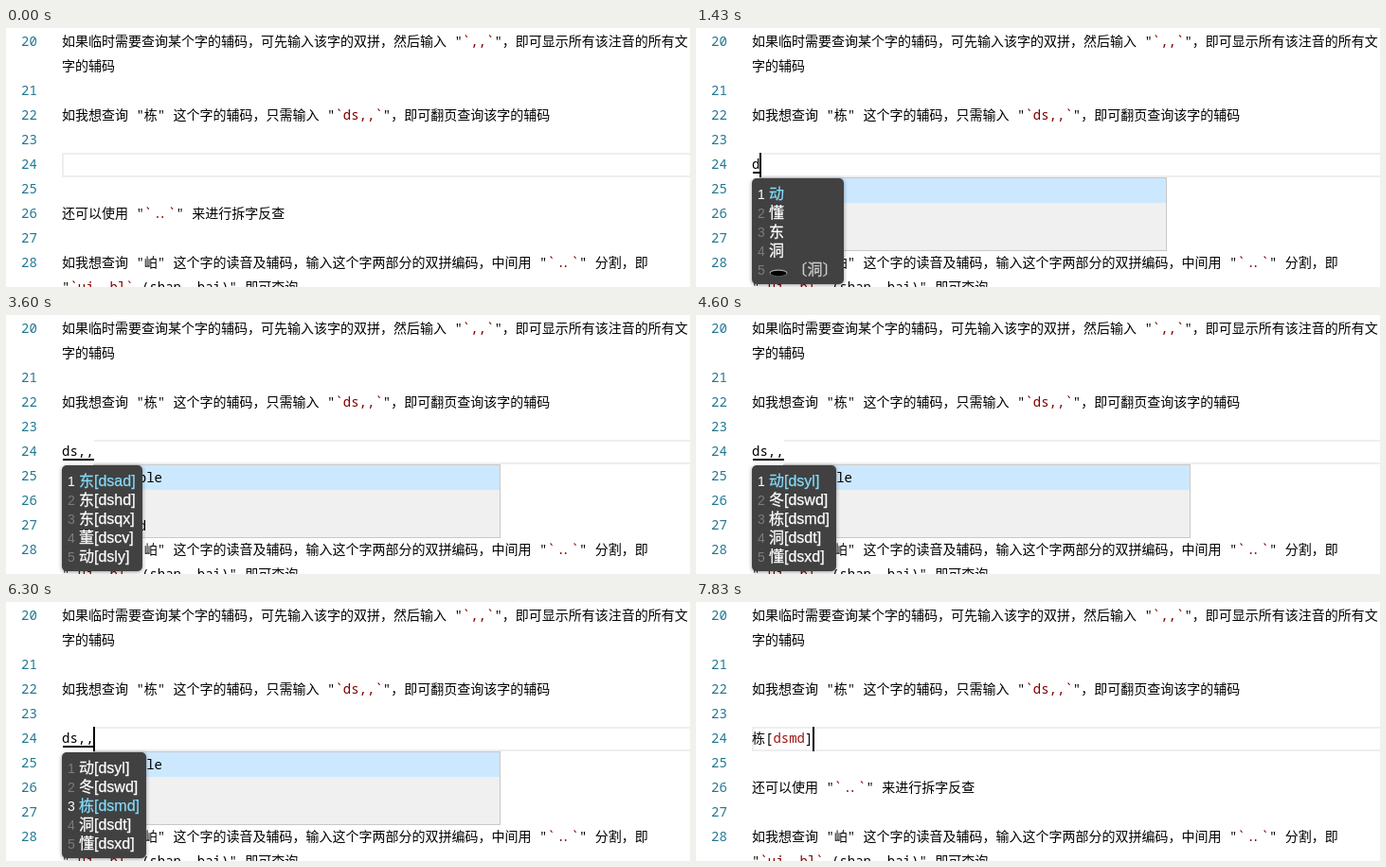
Recreate the animation shown at these times as an HTML page. Size 722 by 274 pixels, loop 8000 ms.

```html
<!DOCTYPE html>
<html lang="zh-CN">
<head>
<meta charset="utf-8">
<style>
html, body { margin: 0; width: 100%; height: 100%; overflow: hidden; background: #fff; }
body { position: relative; color: #000; font: 14px/26px "Noto Sans Mono", "Noto Sans CJK SC", "Noto Sans CJK", monospace;
  font-kerning: none; font-variant-ligatures: none; text-spacing-trim: space-all; }
div { position: absolute; white-space: pre; box-sizing: border-box; }
b { font-weight: 400; color: #800000; }
.dots { letter-spacing: -3.2px; padding: 0 4.8px 0 1.6px; }
.num { left: 16px; color: #237893; }
.row { left: 59px; }
#box { left: 59px; top: 132px; width: 900px; height: 26px; border: 2px solid #eee; }
#typed { left: 59px; top: 131px; height: 27px; }
#typed.comp { background: #fff; }
#typed.comp::after { content: ""; position: absolute; left: 1px; right: 0; top: 21px; height: 1.5px; background: #000; }
#caret { top: 132px; width: 2px; height: 26px; background: #000; }
#hints { top: 158px; width: 430px; height: 78px; background: #f0f0f0; border: 1px solid #c8c8c8; }
#hints div { left: 0; width: 100%; height: 26px; padding-left: 30px; }
#hints div:first-child { background: #cce8ff; }
#ime { left: 59px; top: 159px; height: 112px; padding: 7px 7px 0 6px; border-radius: 5px; background: #414141;
  box-shadow: 0 1px 4px #0006; color: #fff; font: 500 16px/20px "Liberation Sans", "Noto Sans CJK SC", "Noto Sans CJK", sans-serif; }
#ime p { margin: 0; height: 20px; -webkit-text-stroke: .25px; }
#ime i { display: inline-block; width: 12px; font-size: 14px; font-style: normal; color: #7c7c7c; -webkit-text-stroke: 0; }
#ime .on { color: #83dcfa; }
#ime .on i { color: #fff; }
#ime svg { width: 20px; height: 20px; vertical-align: top; }
#ime u { text-decoration: none; color: #ccc; }
</style>
</head>
<body>
<div id="box"></div>
<div id="typed"></div>
<div id="hints"><div style="top:0">table</div><div style="top:26px">ul</div><div style="top:51px">std</div></div>
<div id="caret"></div>
<div id="ime"></div>
<script>
const $ = id => document.getElementById(id);
const LOOP = 8000, LEFT = 59, CHAR = 8.4;

const lines = [
  [20, '如果临时需要查询某个字的辅码，可先输入该字的双拼，然后输入 "`,,`"，即可显示所有该注音的所有文'],
  ['', '字的辅码'],
  [21, ''],
  [22, '如我想查询 "栋" 这个字的辅码，只需输入 "`ds,,`"，即可翻页查询该字的辅码'],
  [23, ''], [24, ''], [25, ''],
  [26, '还可以使用 "`..`" 来进行拆字反查'],
  [27, ''],
  [28, '如我想查询 "岶" 这个字的读音及辅码，输入这个字两部分的双拼编码，中间用 "`..`" 分割，即'],
  ['', '"`uj..bl` (shan, bai)" 即可查询']
];
const markup = s => s.replace(/`[^`]*`/g, '<b>$&</b>').replace('..', '<span class="dots">..</span>');
$('box').insertAdjacentHTML('beforebegin', lines.map(([n, s], i) => {
  const top = `style="top:${1 + 26 * i}px"`;
  return `<div class="num" ${top}>${n}</div><div class="row" ${top}>${markup(s)}</div>`;
}).join(''));

const hole = '<svg viewBox="0 0 20 20"><ellipse cx="10" cy="13" rx="9.5" ry="3.6" fill="#aaa"/>' +
  '<ellipse cx="10" cy="13.6" rx="8.6" ry="2.8"/></svg> <u>〔洞〕</u>';
const plain = ['动', '懂', '东', '洞', hole];
const page1 = ['东[dsad]', '东[dshd]', '东[dsqx]', '董[dscv]', '动[dsly]'];
const page2 = ['动[dsyl]', '冬[dswd]', '栋[dsmd]', '洞[dsdt]', '懂[dsxd]'];

// start, typed text, candidates, selected row, start of the caret blink
const states = [
  [0, '', null, 0, -970],
  [1300, 'd', plain, 0, 1300],
  [1470, 'dong', plain, 0, 1470],
  [2900, 'ds,', plain, 0, 2900],
  [3070, 'ds,,', page1, 0, 3070],
  [4540, 'ds,,', page2, 0, 3070],
  [5870, 'ds,,', page2, 1, 3070],
  [6200, 'ds,,', page2, 2, 3070],
  [7450, '栋[<b style="color:#a31515">dsmd</b>]', null, 0, 7450]
];

let shown;
function show(state) {
  const [, text, list, sel] = state;
  $('typed').innerHTML = text;
  $('typed').className = list ? 'comp' : '';
  const width = list ? text.length * CHAR : text ? 14 + 6 * CHAR : 0;
  const x = Math.floor(LEFT + width);
  $('caret').style.left = x + 'px';
  $('hints').style.left = x + 'px';
  $('hints').hidden = $('ime').hidden = !list;
  $('ime').innerHTML = (list || []).map((s, i) =>
    `<p class="${i === sel ? 'on' : ''}"><i>${i + 1}</i>${s}</p>`).join('');
}

function frame() {
  const t = performance.now() % LOOP;
  const state = states.findLast(s => s[0] <= t);
  if (state !== shown) show(shown = state);
  $('caret').hidden = (t - state[4]) % 1000 >= 500;
  requestAnimationFrame(frame);
}
frame();
</script>
</body>
</html>
```
